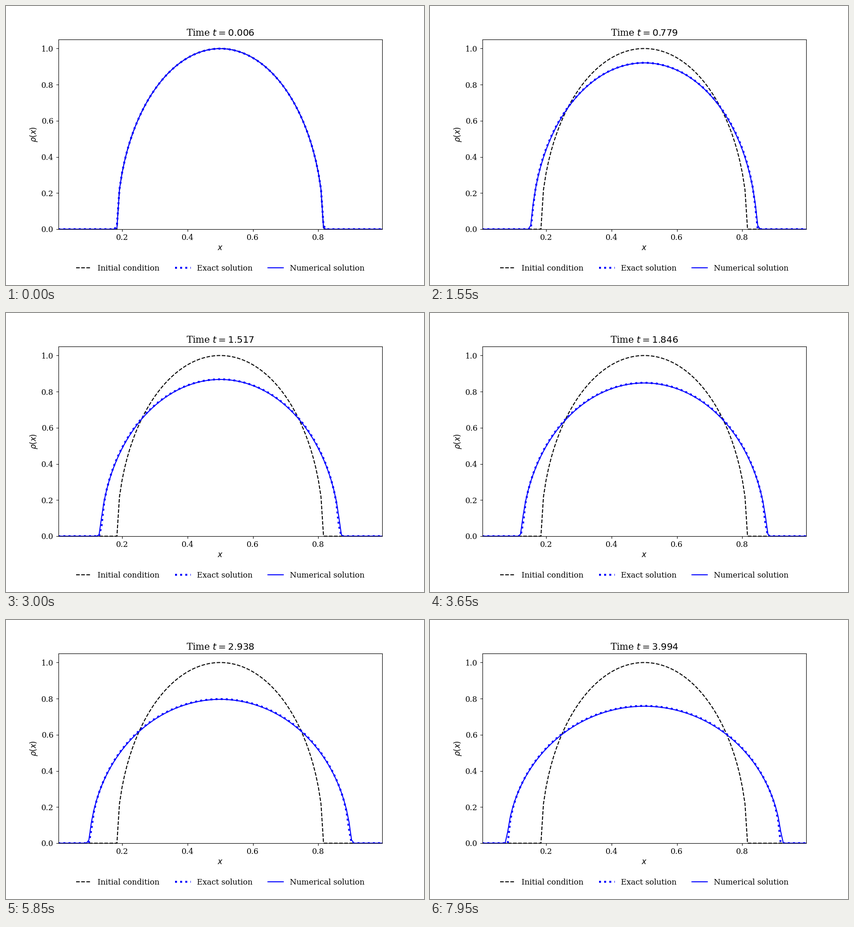
A matplotlib script for the animation above (8000 ms loop, 900 by 600 pixels).

```python
import numpy as np
import matplotlib.pyplot as plt
from matplotlib.animation import FuncAnimation

plt.rcParams.update({"font.family": "serif", "font.size": 12})

FRAMES, INTERVAL = 160, 50
N = 128                # grid cells on [0, 1]
T0 = 2.0               # time scale of the spreading
R0 = np.sqrt(0.1)      # initial half width
KAPPA = R0**2 / (12 * T0)

dx = 1 / N
x = (np.arange(N) + 0.5) * dx
times = np.interp(
    np.arange(FRAMES),
    [0, 31, 47, 73, 92, 117, 159],
    [0.006, 0.779, 1.188, 1.846, 2.312, 2.938, 3.994],
)


def barenblatt(t):
    """Self-similar solution of rho_t = KAPPA * (rho^3)_xx."""
    s = (1 + t / T0) ** 0.25
    return np.sqrt(np.maximum(1 - ((x - 0.5) / (R0 * s)) ** 2, 0)) / s


def step(rho, dt):
    """One upwind finite-volume step."""
    u = -1.5 * KAPPA * np.diff(rho**2) / dx
    flux = np.maximum(u, 0) * rho[:-1] + np.minimum(u, 0) * rho[1:]
    return rho - dt / dx * np.diff(flux, prepend=0, append=0)


def solve(max_dt=0.001):
    rho, t, out = barenblatt(0), 0.0, []
    for target in times:
        n = int(np.ceil((target - t) / max_dt))
        for _ in range(n):
            rho = step(rho, (target - t) / n)
        t = target
        out.append(rho)
    return out


numerical = solve()

fig, ax = plt.subplots(figsize=(9, 6), dpi=100)
fig.subplots_adjust(left=0.125, right=0.9, bottom=0.2, top=0.88)
ax.plot(x, barenblatt(0), "k--", lw=1.5, label="Initial condition")
exact_line, = ax.plot(x, barenblatt(0), ":", color="blue", lw=3,
                      label="Exact solution")
num_line, = ax.plot(x, numerical[0], color="blue", lw=1.5,
                    label="Numerical solution")
ax.set(xlim=(x[0], x[-1]), ylim=(0, 1.05), xlabel="$x$", ylabel=r"$\rho(x)$")
ax.legend(loc="upper center", bbox_to_anchor=(0.5, -0.15), ncol=3,
          frameon=False)


def update(i):
    exact_line.set_ydata(barenblatt(times[i]))
    num_line.set_ydata(numerical[i])
    ax.set_title(f"Time $t = {times[i]:.3f}$")
    return exact_line, num_line


anim = FuncAnimation(fig, update, frames=FRAMES, interval=INTERVAL,
                     repeat=True, repeat_delay=0)
plt.show()
```
